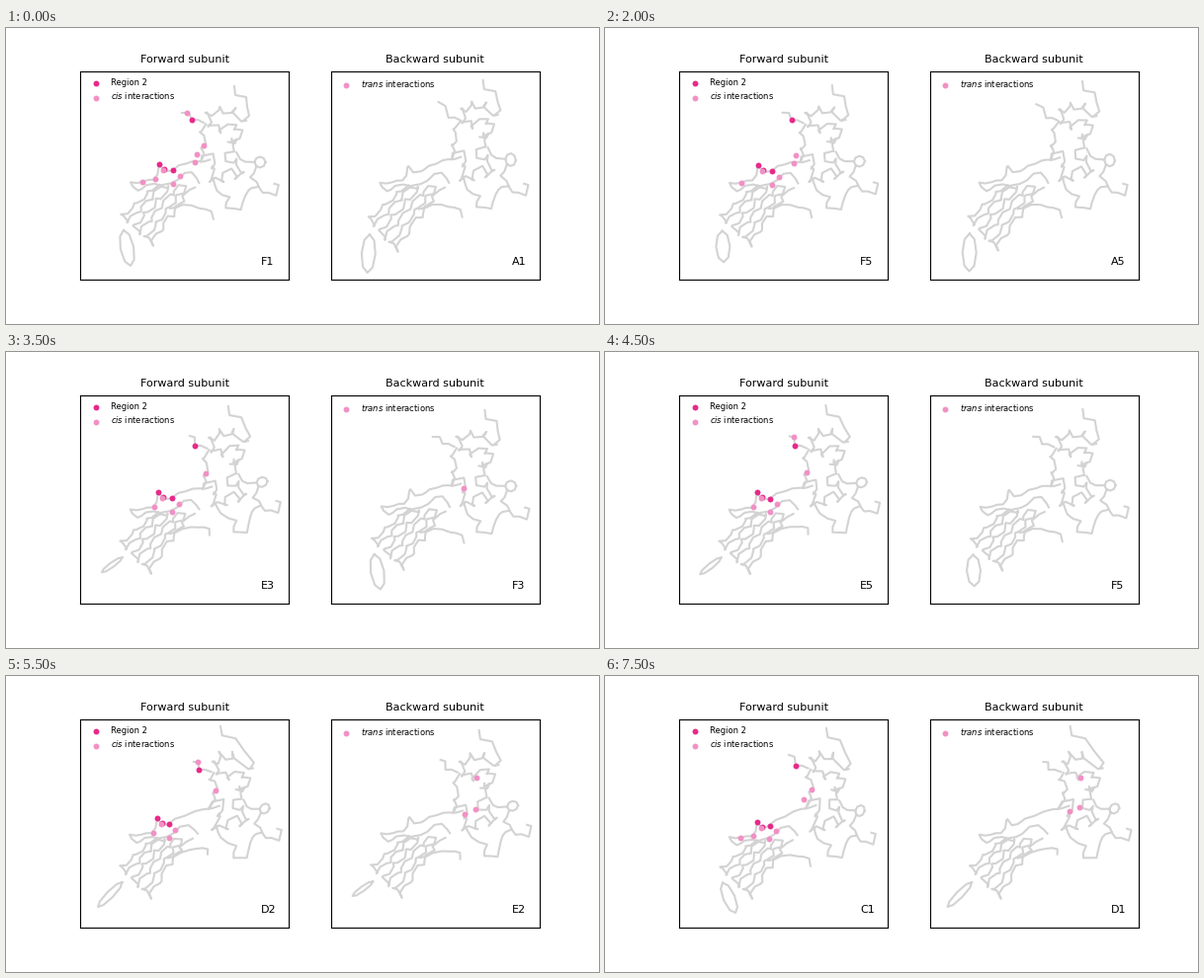
A matplotlib script that plays this animation: 600 by 300 pixels, repeating every 8 s.

```python
import matplotlib.pyplot as plt
import numpy as np
from matplotlib.animation import FuncAnimation

W, H, FRAMES, STEP = 600, 300, 16, 500
LEFT, RIGHT, TOP, SIZE = 75, 328.64, 43.8, 211.36
GREY, DEEP, PINK = "#d3d3d3", "#e7298a", "#f191c5"
rng = np.random.default_rng(4)


def pts(*xy):
    return np.reshape(xy, (-1, 2)).astype(float)


def wind(r, guide, step=4.5):
    """Coil a chain of radius r around a guide line."""
    run = np.append(0, np.cumsum(np.hypot(*np.diff(guide, axis=0).T)))
    at = np.linspace(0, run[-1], int(run[-1] / step) + 1)
    line = np.stack([np.interp(at, run, c) for c in guide.T], 1)
    turn = 1.75 * np.arange(len(at))
    coil = r * np.stack([np.cos(turn), np.sin(turn)], 1)
    return line + coil + rng.normal(0, r / 4, line.shape)


def legs(count=6):
    """Strands running up and down between knee and ankle."""
    knee = np.linspace((152, 159), (188, 162), count)
    ankle = np.linspace((116, 192), (147, 219), count)
    ends = [p for k, pair in enumerate(zip(knee, ankle)) for p in pair[::1 - k % 2 * 2]]
    return wind(2.4, np.array(ends), 5)


angle = np.linspace(0, 2 * np.pi, 9)
RING = np.stack([257 + 5.5 * np.cos(angle), 136 + 5.5 * np.sin(angle)], 1)
PIECES = [
    pts(231, 59, 232, 68, 243, 70, 244, 80, 246, 89, 240, 94),
    wind(3.6, pts(240, 94, 232, 84, 214, 82, 203, 88, 206, 102, 217, 103,
                  231, 98, 238, 107, 228, 116)),
    pts(178, 86, 185, 86, 188, 93, 194, 93, 200, 96),
    wind(3.6, pts(199, 97, 200, 119, 196, 131, 208, 131, 212, 143, 206, 152,
                  218, 156, 226, 146, 238, 152, 236, 137, 222, 131, 234, 118, 224, 112)),
    wind(1.2, pts(208, 152, 217, 170, 226, 171, 222, 183, 239, 183, 245, 161, 256, 162), 7),
    wind(1.2, pts(232, 126, 241, 136, 251, 137), 6), RING,
    wind(1.2, pts(252, 140, 249, 152, 258, 165, 272, 170, 277, 159, 271, 159), 6),
    wind(1.2, pts(206, 133, 191, 136, 178, 137, 169, 145, 160, 144, 155, 138,
                  151, 153, 138, 156, 127, 155, 129, 165, 146, 159, 169, 158,
                  176, 150, 186, 146, 196, 156), 6),
    legs(),
    wind(1, pts(165, 183, 180, 179, 190, 181, 208, 184, 209, 194), 7),
]

# Handles that pull the chain: rest point, then its shift in turns A, E, D, C.
HANDLES = np.array([
    pts(230, 59, -2, -6, -6, -4, -14, -8, -7, -6),
    pts(178, 86, 6, -11, 8, -1, 12, 1, 8, -6),
    pts(188, 93, 6, -2, 3, 2, 7, 2, 5, -2),
    pts(239, 107, 1, -6, 2, -4, 8, 0, 4, 1),
    pts(200, 119, 0, -3, 2, 4, 12, -3, 9, -4),
    pts(277, 159, -1, 0, 2, -7, 3, -3, -2, 1),
    pts(222, 183, 0, -1, 8, 0, 8, 2, 3, 0),
    pts(155, 138, -2, 1, -1, 4, -2, 6, -1, 10),
    pts(176, 150, -1, 1, -1, 4, -5, 6, -3, 7),
    pts(209, 194, -2, -2, -4, -8, -6, -13, -2, -1),
    pts(147, 222, -6, 6, -2, 4, -2, 5, 0, 5),
    pts(126, 241, -14, 7, -29, -18, -33, -7, 6, -1),
])
REST = HANDLES[:, 0]
SHIFTS = np.insert(HANDLES[:, 1:], 1, 0, axis=1)   # turn F is the rest pose
ROOT = pts(119, 205)

REGION = pts(188, 93, 155, 138, 160, 143, 169, 144.5)
RESIDUES = dict(a=(183, 86), b=(200, 119), c=(193, 128), d=(191, 136),
                e=(176, 150), f=(169, 158), g=(151, 153), h=(138, 156),
                i=(159, 144), p=(220, 104), q=(209, 138), r=(219, 134))
# Contacts that hold from a given step on.
CIS = {0: "abcdefghi", 1: "bcdefghi", 3: "cdefhi", 5: "befgi", 8: "abefgi", 15: "bcefghi"}
TRANS = {0: "", 7: "q", 9: "", 10: "pqr"}


def shift(s):
    """Hold each turn's pose, leaning towards the next one near its end."""
    turn, k = divmod(s, 5)
    now = SHIFTS[:, turn + 1]
    later = SHIFTS[:, min(turn + 2, 4)]
    return now + .4 * (k / 5) ** 3 * (later - now)


def bend(p, s):
    """Move points along with the nearby handles (the tail has its own rule)."""
    d2 = ((p[:, None] - REST[None, :-1]) ** 2).sum(2)
    w = 1 / (d2 + 4) ** 1.5
    return p + w @ shift(s)[:-1] / w.sum(1, keepdims=True)


def tail(s):
    root = bend(ROOT, s)[0]
    axis = REST[-1] + shift(s)[-1] - root
    unit = axis / np.hypot(*axis)
    side = 7 * unit[1] ** 2 * np.array([unit[1], -unit[0]])
    along = (1 - np.cos(angle)) / 2
    return root + along[:, None] * axis + np.sin(angle)[:, None] * side


def chain(s):
    parts = [bend(p, s) for p in PIECES] + [tail(s)]
    return np.concatenate([q for p in parts for q in (p, [[np.nan, np.nan]])])


def contacts(table, i, s):
    names = table[max(k for k in table if k <= i)]
    return bend(pts(*[RESIDUES[n] for n in names]), s)


plt.rcParams["font.family"] = "DejaVu Sans"
fig = plt.figure(figsize=(W / 100, H / 100), dpi=100, facecolor="white")


def dots(ax, color, xy=()):
    return ax.scatter(*pts(*xy).T, s=18, color=color, lw=0, zorder=3)


def panel(x, title, legend):
    ax = fig.add_axes([x / W, 1 - (TOP + SIZE) / H, SIZE / W, SIZE / H])
    ax.set(xlim=(LEFT, LEFT + SIZE), ylim=(TOP + SIZE, TOP), xticks=[], yticks=[])
    ax.set_title(title, fontsize=8)
    for y, base, color, label in legend:
        dots(ax, color, (90.8, y))
        ax.text(105.83, base, label, fontsize=6)
    line, = ax.plot([], [], color=GREY, lw=1.5, zorder=1)
    return ax, line, ax.text(257.9, 240.5, "", fontsize=8)


ax_f, line_f, tag_f = panel(LEFT, "Forward subunit", [
    (55.8, 58.5, DEEP, "Region 2"), (70.8, 72.5, PINK, "$cis$ interactions")])
ax_b, line_b, tag_b = panel(RIGHT, "Backward subunit", [
    (57.7, 59.5, PINK, "$trans$ interactions")])
region, cis, trans = dots(ax_f, DEEP), dots(ax_f, PINK), dots(ax_b, PINK)


def draw(i):
    # The backward subunit follows the forward one a whole turn later.
    line_f.set_data(*chain(i).T)
    line_b.set_data(*chain(i - 5).T)
    region.set_offsets(bend(REGION, i))
    cis.set_offsets(contacts(CIS, i, i))
    trans.set_offsets(contacts(TRANS, i, i - 5))
    turn, k = divmod(i, 5)
    tag_f.set_text(f"{'FEDC'[turn]}{k + 1}")
    tag_b.set_text(f"{'AFED'[turn]}{k + 1}")
    return line_f, line_b, region, cis, trans, tag_f, tag_b


anim = FuncAnimation(fig, draw, frames=FRAMES, interval=STEP, repeat=True,
                     repeat_delay=0, blit=False)
plt.show()
```
